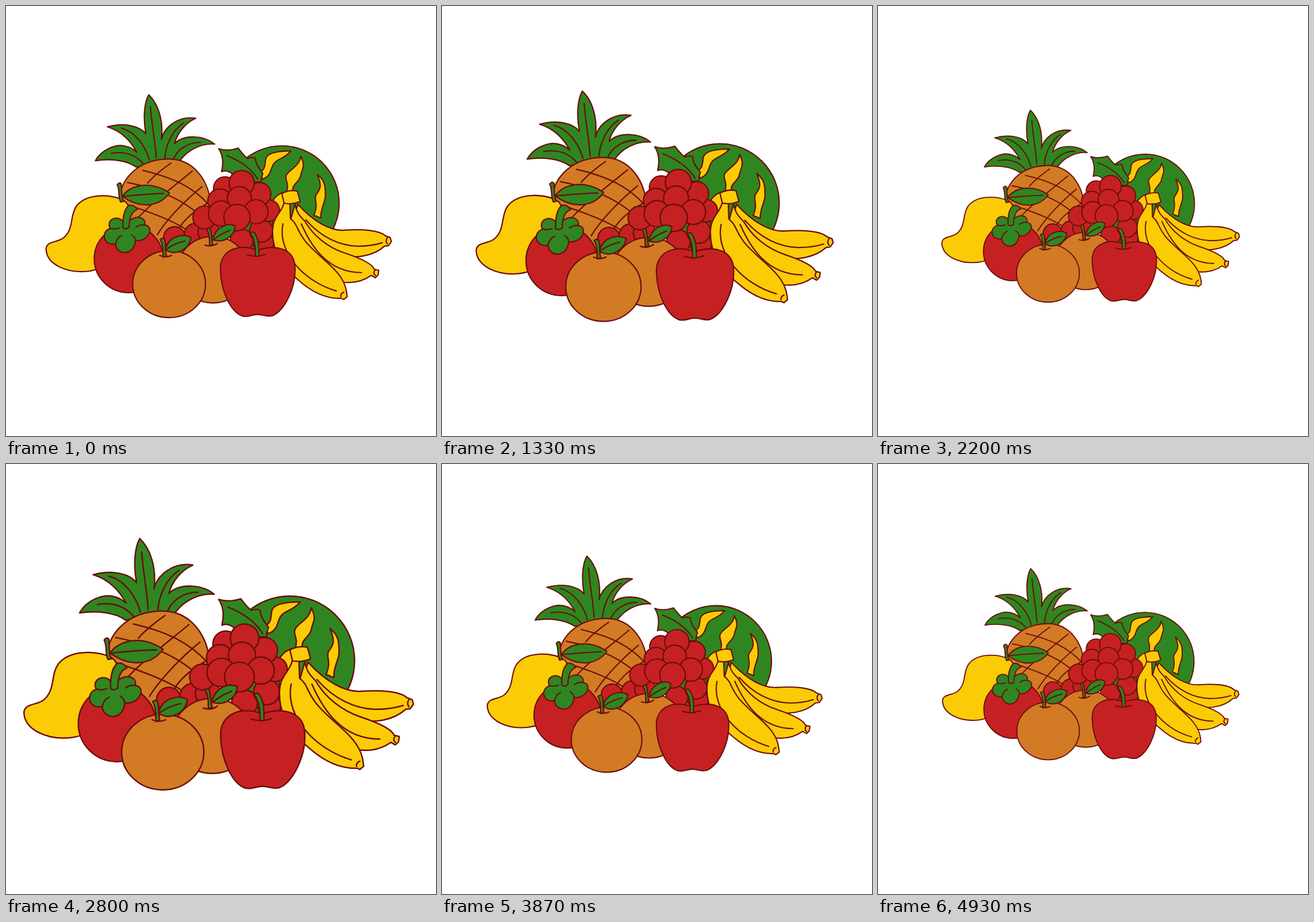
These frames come from a looping animation (748x748 px, 4.99 s). An HTML page:

```html
<!DOCTYPE html>
<html lang="en">
<meta charset="utf-8">
<title>Fruit pulse</title>
<style>
  html, body { margin: 0; width: 100%; height: 100%; overflow: hidden; background: #fff; }
  svg { display: block; width: 100vw; height: 100vh; }
  g { stroke: #6b0d0d; stroke-width: 2.2; stroke-linecap: round; stroke-linejoin: round; }
  .r { fill: #c62122; }
  .g { fill: #2f8620; }
  .o { fill: #d27b24; }
  .y { fill: #fbcb05; }
  .l { fill: none; }
</style>
<svg viewBox="0 0 748 748">
  <g id="fruit">
    <!-- watermelon -->
    <circle class="g" cx="480" cy="343" r="100"/>
    <path class="y" d="M496 252C470 252 454 256 452 266C450 278 452 284 440 290L447 301C463 294 460 282 466 274C472 265 484 266 496 252Z
      M513 261C512 278 492 285 488 294C484 303 494 306 488 325L500 325C495 310 510 308 513 295C514 285 523 280 513 261Z
      M542 293C550 312 548 318 540 328C535 338 545 342 536 364L548 369C547 352 556 342 556 330C556 315 556 304 542 293Z
      M484 324C473 327 466 333 461 345L466 400L490 345Z"/>

    <!-- pineapple -->
    <path class="g" d="M155 269C165 250 190 240 205 243C215 245 222 249 227 254C217 235 200 217 176 210C205 202 232 208 243 222C238 195 240 168 248 154C265 170 274 200 270 232C275 210 300 190 330 195C312 203 298 220 293 239C310 222 345 225 363 240C340 238 315 250 302 270L226 280C210 268 180 265 155 269Z"/>
    <path class="l" d="M251 175C253 205 260 240 261 264M200 212C225 218 243 245 249 268M183 256C205 252 225 258 239 275M309 203C290 215 278 240 276 264M338 237C315 237 298 250 291 266"/>
    <path class="o" d="M196 340C199 295 235 266 283 266C330 266 356 310 356 350C356 420 320 450 270 450C225 450 190 400 196 340Z"/>
    <path class="l" d="M238 286C290 298 325 315 352 345M211 307C255 315 310 335 345 372M205 344C240 355 290 372 318 392M287 273C270 285 255 297 246 308M324 287C290 315 250 345 226 372M341 314C315 335 280 370 263 398M351 343C335 352 312 368 300 388"/>

    <!-- grapes -->
    <path class="g" d="M370 248C382 252 395 250 404 247C410 255 415 261 420 265Q430 262 434 265C434 275 442 285 447 291Q444 298 444 306L410 306L395 293Q385 284 375 288C378 275 378 260 370 248Z"/>
    <path class="l" d="M384 260C405 268 425 280 438 301"/>
    <g id="grapes" class="r"></g>

    <!-- bananas -->
    <g class="y">
      <path d="M508 345C535 375 565 392 590 390C620 388 650 390 661 400L669 403L671 410L666 417L659 418C640 435 610 440 585 434C550 425 525 400 502 365Z"/>
      <path class="l" d="M522 372C548 402 580 417 612 418Q636 418 655 412M664 403Q660 409 664 414"/>
      <path d="M503 345C506 360 512 366 520 374C535 400 560 420 590 430C620 440 638 450 641 458L649 460L648 468L643 473L636 469C615 484 590 484 565 476C530 460 500 420 496 370Z"/>
      <path class="l" d="M514 379C530 415 558 464 619 464M643 459Q638 465 643 469"/>
      <path d="M484 342C480 360 465 365 464 390C463 420 475 450 510 478C535 500 560 510 584 509L588 511L594 506L593 498C588 460 545 440 520 408C505 388 508 380 495 370L494 342Z"/>
      <path class="l" d="M482 379C472 430 520 480 575 496M588 498Q582 501 583 506"/>
      <path d="M480 326Q494 319 507 322L512 340Q498 346 484 343Z"/>
    </g>

    <!-- mango -->
    <path class="y" d="M69 422C71 408 90 412 100 403C118 387 110 365 122 348C140 325 180 328 200 336C214 342 214 350 214 370C214 420 180 458 140 462C105 465 69 450 69 422Z"/>
    <path class="g" d="M193 311Q196 306 200 309C202 320 199 328 204 340L199 341C194 331 198 320 193 311Z"/>
    <path class="g" d="M202 331C215 312 250 302 284 325C268 348 235 355 202 331Z"/>
    <path class="l" d="M204 331Q240 327 274 326"/>

    <!-- mangosteen -->
    <ellipse class="r" cx="213" cy="440" rx="60" ry="59"/>
    <path class="g" d="M204 376C195 362 172 371 181 387C164 392 168 418 190 414C192 434 222 436 225 408C246 412 260 384 241 381C244 368 228 363 215 373Z"/>
    <path class="l" d="M190 414Q192 403 201 399M225 408Q224 401 218 398M181 387Q190 389 197 386M241 381Q232 380 226 385"/>
    <path class="g" d="M203 386C202 370 205 355 212 348C218 344 226 349 228 354C217 358 214 372 214 385Q208 390 203 386Z"/>

    <!-- oranges -->
    <ellipse class="o" cx="360" cy="459" rx="62" ry="58"/>
    <path class="l" d="M346 416Q358 420 368 413"/>
    <path class="g" d="M349 388Q352 385 355 387C358 396 357 405 360 415L354 417C354 405 354 396 349 388Z"/>
    <path class="g" d="M360 407C363 386 385 375 399 383C397 402 378 413 360 407Z"/>
    <path class="l" d="M362 406Q374 396 390 390"/>
    <ellipse class="o" cx="283.5" cy="484" rx="63.5" ry="58.5"/>
    <path class="l" d="M267 434Q278 439 288 434"/>
    <path class="g" d="M268 406Q272 403 275 405C279 415 276 425 279 435L273 437C273 425 273 415 268 406Z"/>
    <path class="g" d="M277 424C282 402 305 394 322 403C318 424 295 436 277 424Z"/>
    <path class="l" d="M279 423Q293 413 311 409"/>

    <!-- apple -->
    <path class="r" d="M437 425C405 412 371 425 373 460C374 495 390 533 412 540C424 542 426 537 438 537C450 537 452 542 464 539C485 530 505 490 503 455C502 422 470 414 437 425Z"/>
    <path class="l" d="M420 433Q437 438 452 432"/>
    <path class="g" d="M425 395Q428 392 432 394C441 408 440 420 440 435L434 436C434 420 434 408 425 395Z"/>
  </g>
</svg>
<script>
  const grapes = [
    [293, 403, 19], [330, 398, 20], [353, 393, 19], [345, 368, 20], [410, 408, 20], [448, 412, 18],
    [444, 391, 20], [457, 356, 19], [381, 317, 20], [441, 327, 20], [410, 308, 22],
    [372, 339, 21], [406, 335, 21], [435, 358, 21], [374, 361, 22], [402, 368, 23]
  ];
  document.getElementById("grapes").innerHTML =
    grapes.map(([x, y, r]) => `<circle cx="${x}" cy="${y}" r="${r}"/>`).join("");

  const fruit = document.getElementById("fruit");
  const LOOP = 4990, STEP = 200 / 3, BEAT = 1300, FALL = 13 * STEP;

  // Slow eased shrink followed by a quick accelerating swell.
  function swell(t) {
    const u = (t + 17.6 * STEP) % BEAT;
    return u < FALL
      ? (1 - (u / FALL) ** 1.35) ** 2
      : ((u - FALL) / (BEAT - FALL)) ** 2.05;
  }

  function draw(now) {
    const t = Math.floor((now % LOOP + 4) / STEP) * STEP;
    const scale = 0.854 + 0.292 * swell(t);
    fruit.setAttribute("transform", `translate(370 348) scale(${scale}) translate(-370 -348)`);
    requestAnimationFrame(draw);
  }
  draw(0);
</script>
</html>
```
